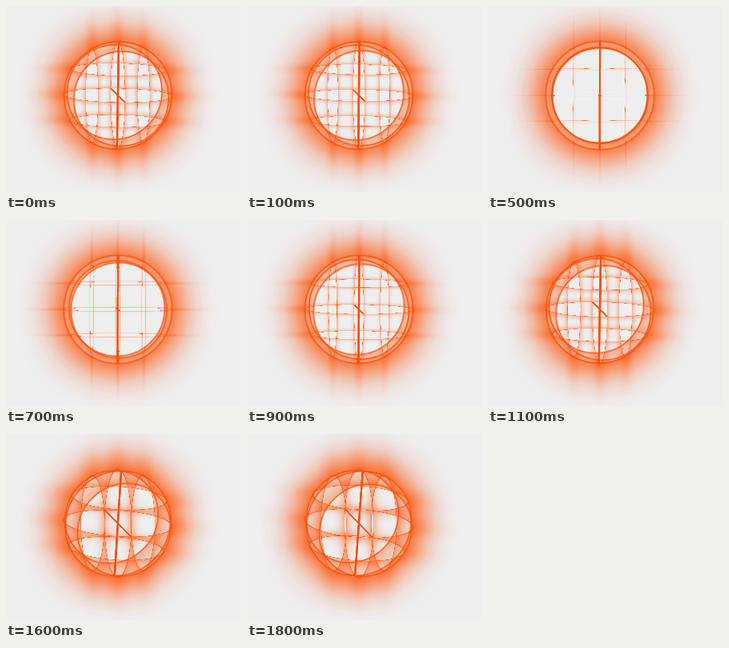
An HTML page for the animation above (1.9 s loop, 294 px wide and 233 px high).

```html
<!DOCTYPE html>
<html lang="en">
<head>
<meta charset="utf-8">
<title>Glowing wire sphere</title>
<style>
  html, body { margin: 0; width: 100%; height: 100%; overflow: hidden; background: #eee; }
  #sphere { position: absolute; left: 140px; top: 111.8px; transform-style: preserve-3d; }
  #sphere div { position: absolute; box-sizing: border-box; }
  .ring { border: 3px solid #ff4d00; border-radius: 50%; box-shadow: 0 0 100px #ff4d00e0; }
  .bar { background: #ff4d00; }
</style>
</head>
<body>
<div id="sphere"></div>
<script>
// Built at double size and scaled down, so that lines can be 1.5px wide.
const RADIUS = 137, OFFSET = 65, BAR = 6, LOOP = 1900, STEP = 100;
const sphere = document.getElementById('sphere');

function addPart(kind, width, height, transform) {
  const part = document.createElement('div');
  part.className = kind;
  part.style.cssText = `width:${width}px;height:${height}px;` +
    `left:${-width / 2}px;top:${-height / 2}px;transform:${transform}`;
  sphere.append(part);
}

// Three parallel slices of the sphere along each axis.
for (const turn of ['rotateY(90deg)', 'rotateX(90deg)', '']) {
  for (const offset of [-OFFSET, 0, OFFSET]) {
    const size = 2 * Math.sqrt(RADIUS ** 2 - offset ** 2);
    addPart('ring', size, size, `${turn} translateZ(${offset}px)`);
  }
}

// Flat bars along the axes.
addPart('bar', BAR, 2 * RADIUS, 'none');
addPart('bar', BAR, 2 * RADIUS, 'rotateX(90deg)');
addPart('bar', 2 * RADIUS, BAR, 'rotateX(90deg)');

// Tilt in degrees at times in ms.
const tilts = [[0, -7.4], [300, -3.6], [700, 2], [1100, 7.8], [1300, 11], [1600, 14.3], [1800, 15.4]];

function tiltAt(time) {
  const next = Math.max(1, tilts.findIndex(([t]) => t >= time));
  const [t0, a0] = tilts[next - 1], [t1, a1] = tilts[next];
  return a0 + (a1 - a0) * (time - t0) / (t1 - t0);
}

function draw() {
  const time = Math.floor(performance.now() % LOOP / STEP) * STEP;
  const tilt = tiltAt(time);
  sphere.style.transform = `scale3d(.5, .5, .5) rotateY(${tilt}deg) rotateX(${-tilt}deg)`;
  requestAnimationFrame(draw);
}
draw();
</script>
</body>
</html>
```
